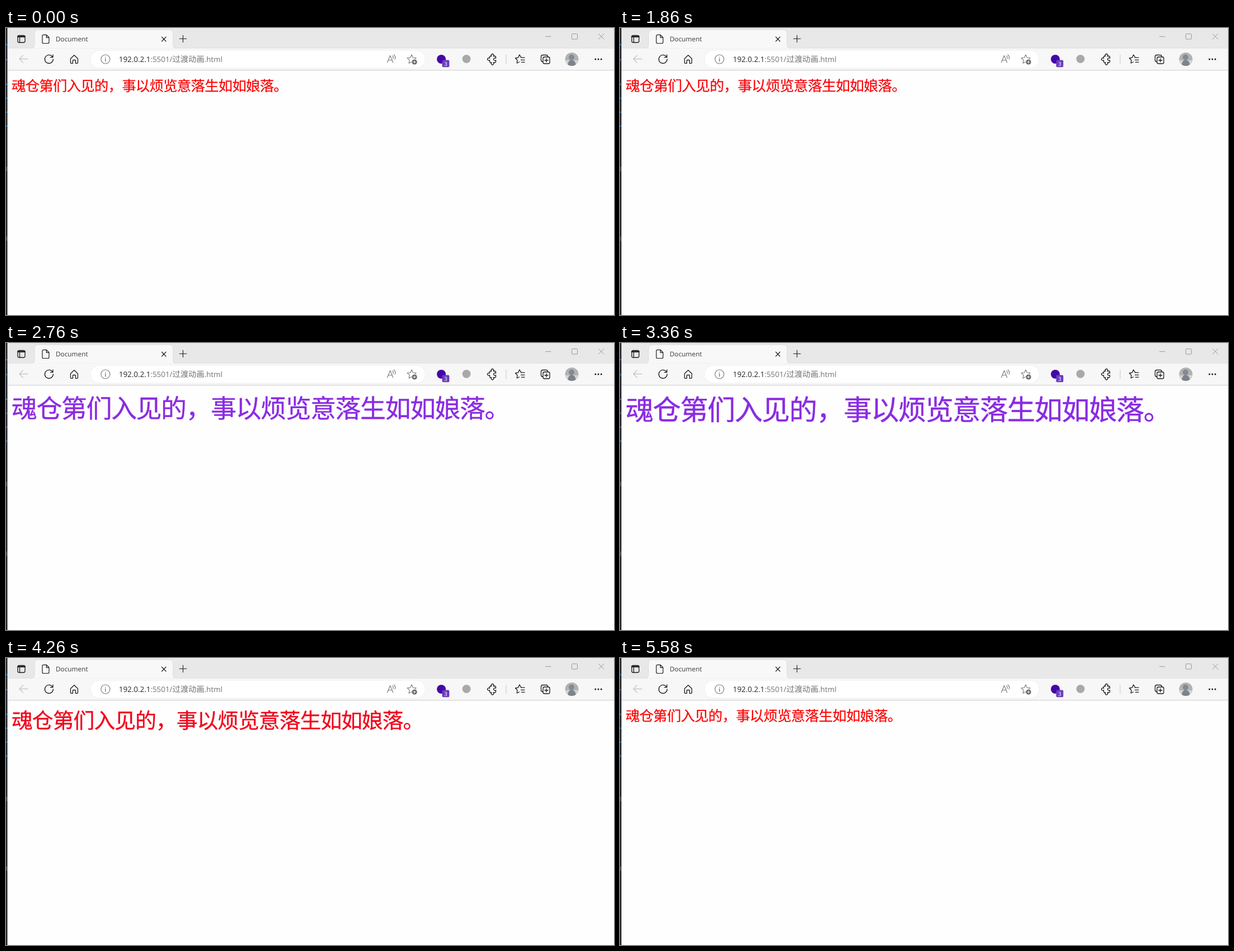
An HTML page for the animation above (6.06 s loop, 1088x515 px).

```html
<!DOCTYPE html>
<html lang="zh-CN">
<head>
<meta charset="utf-8">
<title>Document</title>
<style>
  html, body { margin: 0; width: 100%; height: 100%; overflow: hidden; background: #fefefe; }
  svg { display: block; width: 1088px; height: 515px; }
  text { font-family: "Open Sans", "Noto Sans CJK SC", "Noto Sans CJK", sans-serif; text-rendering: geometricPrecision; }
  .cjk { font-family: "Noto Sans CJK SC", "Noto Sans CJK", sans-serif; }
  #sentence { letter-spacing: -.03em; stroke-width: .008em; }
  .line { fill: none; stroke: #1b1b1b; stroke-width: 1.3; stroke-linecap: round; stroke-linejoin: round; }
  .grey { stroke: #757575; stroke-width: 1.1; }
  .pale { stroke: #999; stroke-width: 1; }
</style>
</head>
<body>
<svg viewBox="0 0 1088 515">
  <defs>
    <clipPath id="round"><circle cx="1012.5" cy="56" r="12"/></clipPath>
    <path id="star" d="M0-8 L2.4-2.8 8-2.2 3.8 1.6 5 7.2 0 4.4 -5 7.2 -3.8 1.6 -8-2.2 -2.4-2.8Z"/>
  </defs>

  <!-- window -->
  <rect width="1088" height="515" fill="#fefefe"/>
  <rect x="3" width="1085" height="37" fill="#e8e8e8"/>
  <rect x="3" y="36" width="1085" height="39.5" fill="#f7f7f7"/>
  <path d="M3 36H51M299 36H1088" stroke="#dcdcdc"/>
  <path d="M3 75.8H1088" stroke="#c9c9c9"/>
  <path d="M45 36.5Q51 36.5 51 30V10Q51 3 58 3H292Q299 3 299 10V30Q299 36.5 305 36.5Z" fill="#f8f8f8" stroke="#d6d6d6" stroke-width=".8"/>
  <rect x="46" y="36.2" width="258" height="2" fill="#f7f7f7"/>

  <!-- sliver of the dark window behind -->
  <rect width="2.5" height="515" fill="#25262b"/>
  <path d="M2.5 0V515" stroke="#8b8b8b" stroke-width="1"/>
  <path d="M0 30H2M0 57H2M0 101H2M0 126H2M0 151H2M0 176H2" stroke="#2f78b8" stroke-width="2"/>
  <path d="M1 253H2.5M1 378H2.5" stroke="#98695f" stroke-width="8"/>

  <!-- tab strip -->
  <g class="line">
    <rect x="21" y="13.5" width="13" height="12.5" rx="2.5"/>
    <path d="M21.5 15.5H33.5" stroke-width="2.6"/>
    <path d="M24.5 17V25.5"/>
    <path d="M67 12.3H72.5L77 17V25.5Q77 27.5 75 27.5H67Q65 27.5 65 25.5V14.3Q65 12.3 67 12.3ZM72.3 12.5V17.2H76.8" stroke-width="1.2"/>
    <path d="M278.7 16L286.3 24M286.3 16L278.7 24" stroke-width="1.1"/>
    <path d="M310.5 19.2H323M316.7 13V25.5" stroke-width="1.1"/>
  </g>
  <text x="89" y="24" font-size="11.8" fill="#3b3b3b">Document</text>
  <g class="line pale">
    <path d="M965.5 15.3H975M1060.5 10.5L1070 20M1070 10.5L1060.5 20"/>
    <rect x="1012.5" y="10.5" width="10" height="9.5" rx="1"/>
  </g>

  <!-- navigation -->
  <g class="line">
    <path d="M39 55.5H24M30.5 49L24 55.5 30.5 62" stroke="#c6c6c6"/>
    <path d="M83.4 52.2A7.5 7.5 0 1 0 84.4 56M84 48V52.6H79.4"/>
    <path d="M115.5 55L122 48.8 128.5 55V62.3Q128.5 63.3 127.5 63.3H124.5V58.5Q124.5 57.5 123.5 57.5H120.5Q119.5 57.5 119.5 58.5V63.3H116.5Q115.5 63.3 115.5 62.3Z"/>
  </g>

  <!-- address bar -->
  <rect x="151" y="40" width="599.5" height="32" rx="16" fill="#fff" stroke="#ececec" stroke-width=".8"/>
  <g class="line grey">
    <circle cx="178" cy="56" r="8"/>
    <path d="M178 55V60M178 52.2V52.4" stroke-width="1.4"/>
    <path d="M682.3 62L687.5 49.5 692.7 62M684.2 57.7H690.8"/>
    <path d="M691.8 50.2Q693.7 52 692.8 55M694 48Q698 51.5 696 56"/>
    <use href="#star" x="726" y="56"/>
  </g>
  <circle cx="731" cy="61" r="5.4" fill="#fff"/>
  <circle cx="731" cy="61" r="4.6" fill="#666"/>
  <path d="M728.5 61H733.5M731 58.5V63.5" stroke="#fff" stroke-width="1.1"/>
  <text x="202" y="61" font-size="13.4" fill="#727272"><tspan fill="#222">192.0.2.1</tspan>:5501/<tspan class="cjk" font-size="14.3">过渡动画</tspan>.html</text>

  <!-- extensions -->
  <circle cx="779" cy="56" r="8" fill="#4307a7"/>
  <rect x="780.5" y="57.5" width="12.8" height="12.8" rx="2" fill="#6a3bbd"/>
  <text x="786.9" y="67.6" font-size="10" text-anchor="middle" fill="#fff">3</text>
  <circle cx="824" cy="55.5" r="7.5" fill="#a9a9a9"/>
  <path d="M895 48V64.5" stroke="#c8c8c8"/>
  <g class="line">
    <path d="M867 50.5H868.8A2.3 2.3 0 1 1 872.2 50.5H875Q876.5 50.5 876.5 52V54.3A2.3 2.3 0 1 0 876.5 57.7V60.5Q876.5 62 875 62H872.2A2.3 2.3 0 1 1 868.8 62H867Q865.5 62 865.5 60.5V57.7A2.3 2.3 0 1 1 865.5 54.3V52Q865.5 50.5 867 50.5Z"/>
    <path d="M921.5 52.2L918.8 48 916.5 53.2 911.5 54 915 57.7 914.3 63 918.5 61M921.5 53.2H928M921.5 57.3H928M922.5 61.4H928"/>
    <path d="M960.5 60.5Q957.5 60.5 957.5 57.5V51.5Q957.5 48.5 960.5 48.5H966.5Q969.5 48.5 969.5 51.5"/>
    <rect x="961" y="52" width="12" height="12" rx="2.6"/>
    <path d="M964 58H970M967 55V61"/>
  </g>

  <!-- profile picture -->
  <g clip-path="url(#round)">
    <rect x="1000" y="44" width="25" height="25" fill="#b0b3b2"/>
    <rect x="1000" y="58" width="25" height="11" fill="#d4d4d4"/>
    <path d="M1005 69Q1005 58 1012 57Q1020 58 1020 69Z" fill="#7c838d"/>
    <circle cx="1012" cy="52.5" r="5" fill="#858a92"/>
  </g>
  <g id="dots" fill="#1b1b1b">
    <circle cx="1054.8" cy="56" r="1.5"/><circle cx="1060" cy="56" r="1.5"/><circle cx="1065.2" cy="56" r="1.5"/>
  </g>

  <text id="sentence" class="cjk" x="10">魂仓第们入见的，事以烦览意落生如如娘落。</text>
</svg>
<script>
const LOOP = 6060, STEP = 60;
const GROW = 1805, SHRINK = 3705;
const SIZE_TIME = 1880, COLOR_TIME = 940;
const SMALL = 25.45, LARGE = 50.75;
const RED = [255, 0, 0], VIOLET = [138, 43, 226];
const sentence = document.getElementById('sentence');
const dots = document.getElementById('dots');

const mix = (a, b, p) => a + (b - a) * p;

const bezier = (a, b, u) => 3 * a * u * (1 - u) ** 2 + 3 * b * u * u * (1 - u) + u ** 3;

// CSS "ease": cubic-bezier(.25, .1, .25, 1)
function ease(x) {
  if (x <= 0) return 0;
  if (x >= 1) return 1;
  let low = 0, high = 1;
  for (let i = 0; i < 24; i++) {
    const mid = (low + high) / 2;
    if (bezier(.25, .25, mid) < x) low = mid; else high = mid;
  }
  return bezier(.1, 1, low);
}

const hover = (t, duration) => t < SHRINK
  ? ease((t - GROW) / duration)
  : 1 - ease((t - SHRINK) / duration);

function draw(time) {
  const t = Math.floor((time % LOOP) / STEP) * STEP;
  const size = mix(SMALL, LARGE, hover(t, SIZE_TIME));
  const tint = hover(t, COLOR_TIME);
  const color = `rgb(${RED.map((c, i) => Math.round(mix(c, VIOLET[i], tint)))})`;
  sentence.setAttribute('font-size', size);
  sentence.setAttribute('y', 86.3 + 1.035 * size);
  sentence.setAttribute('fill', color);
  sentence.setAttribute('stroke', color);
  dots.setAttribute('fill', t >= 540 && t < 840 ? '#3a3a3a' : '#1b1b1b');
}

const start = performance.now();
function tick() {
  draw(performance.now() - start);
  requestAnimationFrame(tick);
}
tick();
</script>
</body>
</html>
```
